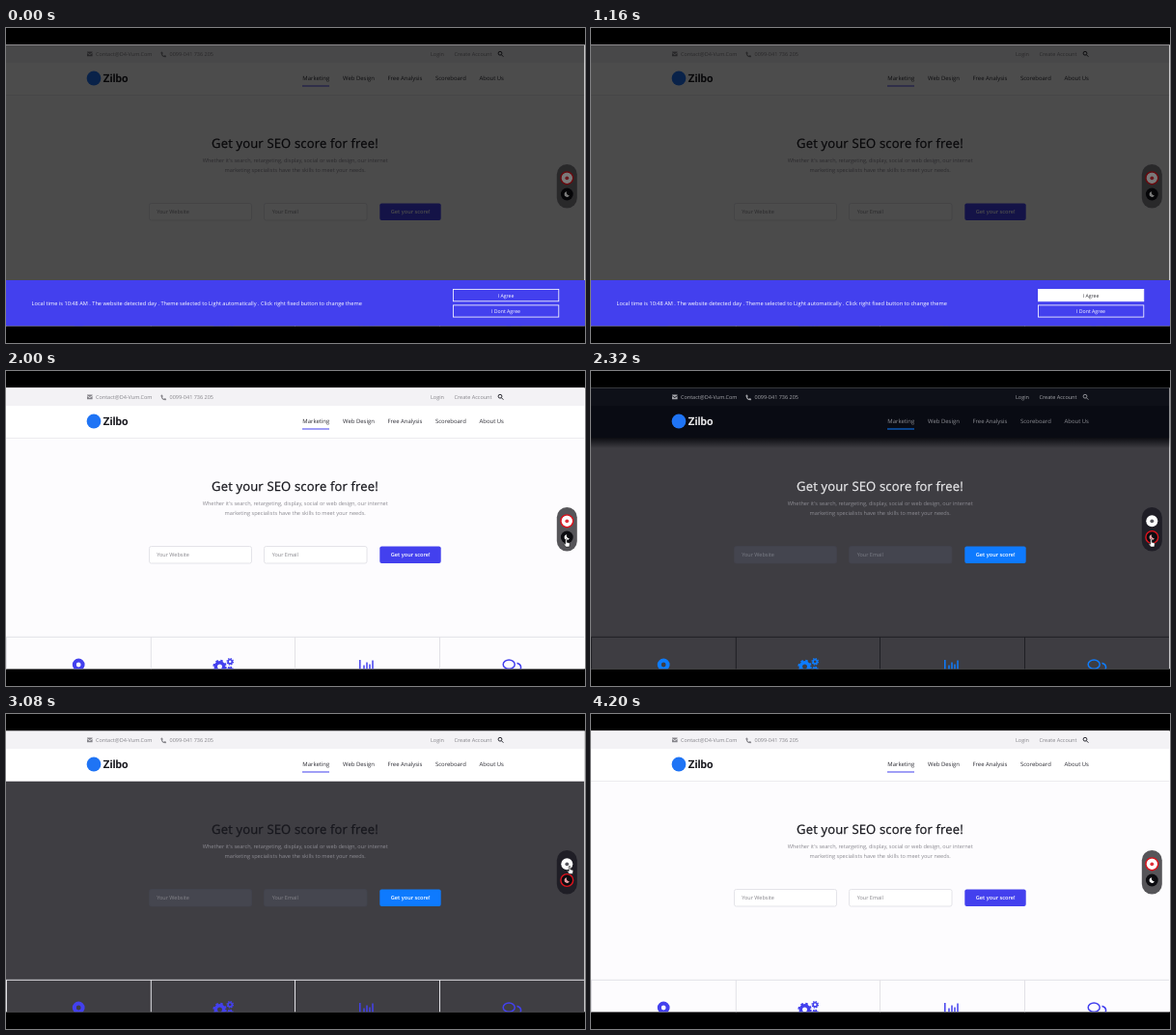
Write an HTML page that moves like this. It is 600 by 326 pixels and loops after 4280 ms.

```html
<!DOCTYPE html>
<html lang="en">
<head>
<meta charset="utf-8">
<title>SEO score page with theme switch</title>
<style>
html, body { margin: 0; width: 100%; height: 100%; overflow: hidden; background: #000; }
svg {
  display: block; width: 600px; height: 326px;
  font: 5.6px "Open Sans", "Noto Sans", sans-serif; text-rendering: geometricPrecision;
  --bar: #f3f2f5; --head: #fff; --top: #85848a; --nav: #2b2b33; --ink: #17171d;
  --sub: #8c8b92; --line: #e2e1e6; --accent: #4340ee; --hint: #85848a;
}
svg.dark {
  --bar: #0e1018; --head: #090b13; --top: #a4a5aa; --nav: #8d8e94; --ink: #e8e8ea;
  --line: #1f1f24; --accent: #0d7cff; --hint: #7b7e87;
}
.top { fill: var(--top); font-size: 5.5px; }
.nav { fill: var(--nav); font-size: 5.95px; }
.brand { fill: var(--ink); font: 700 11.5px Roboto, sans-serif; }
.title { fill: var(--ink); stroke: var(--ink); stroke-width: .25; font-size: 13px; letter-spacing: .17px; }
.sub { fill: var(--sub); }
.mid { text-anchor: middle; }
.hint { fill: var(--hint); font-size: 5.5px; }
.field { fill: var(--field); stroke: var(--edge); stroke-width: .8; }
.outline { fill: none; stroke: var(--accent); stroke-width: 1.5; }
.cards { fill: none; stroke: var(--line); }
.choice { fill: none; stroke: #fff; stroke-width: .8; }
.notice { fill: #fff; font-size: 5.64px; }
.notice .mid { font-size: 5.2px; }
.hover #agree { fill: #fff; }
.hover #agreeText { fill: #33333a; }
.cursor { fill: #fff; stroke: #111; stroke-width: .6; }
</style>
</head>
<body>
<svg id="stage" viewBox="0 0 600 326">
  <defs>
    <clipPath id="screen"><rect y="17.5" width="600" height="290.7"/></clipPath>
    <linearGradient id="shade" x2="0" y2="1">
      <stop stop-color="#06070c" stop-opacity=".9"/>
      <stop offset="1" stop-color="#06070c" stop-opacity="0"/>
    </linearGradient>
  </defs>
  <g clip-path="url(#screen)">
    <rect y="17" width="600" height="292" fill="#fff"/>
    <rect y="17" width="599.3" height="292" fill="var(--bg)"/>

    <!-- header -->
    <rect y="17" width="599.3" height="19" fill="var(--bar)"/>
    <rect y="36" width="599.3" height="33" fill="var(--head)"/>
    <rect id="headLine" y="69" width="599.3" height=".8" fill="#e9e8ec"/>
    <rect id="headShade" y="69" width="599.3" height="11" fill="url(#shade)"/>
    <g class="top">
      <path d="M84 24.6h5.6v.7l-2.8 1.8-2.8-1.8zM84 26.1l2.8 1.8 2.8-1.8v3.1h-5.6z"/>
      <text x="93" y="29">Contact@D4-Vum.Com</text>
      <path d="M160.4 25l1.4-.6 1 1.8-.9.9q.6 1.3 1.8 1.8l.8-.9 1.7 1-.6 1.3q-4.8.2-5.2-5.3z"/>
      <text x="169.5" y="29">0099-041 736 205</text>
      <text x="440" y="29">Login</text>
      <text x="464.5" y="29">Create Account</text>
    </g>
    <g fill="none" stroke="var(--nav)" stroke-width="1"><circle cx="512" cy="26.2" r="1.9"/><path d="M513.4 27.7l2 2"/></g>
    <circle cx="91" cy="52" r="7.4" fill="#1f74f5"/>
    <text class="brand" x="100.5" y="56.2">Zilbo</text>
    <g class="nav">
      <text x="307.3" y="54.2">Marketing</text>
      <text x="349" y="54.2">Web Design</text>
      <text x="395.5" y="54.2">Free Analysis</text>
      <text x="445" y="54.2">Scoreboard</text>
      <text x="490.5" y="54.2">About Us</text>
    </g>
    <rect x="307" y="59.5" width="28" height="1" fill="var(--accent)"/>

    <!-- form -->
    <text class="title mid" x="299.5" y="124">Get your SEO score for free!</text>
    <g class="sub mid">
      <text x="299.7" y="139">Whether it's search, retargeting, display, social or web design, our internet</text>
      <text x="299.7" y="148.5">marketing specialists have the skills to meet your needs.</text>
    </g>
    <rect class="field" x="148.5" y="181.5" width="106" height="17.5" rx="2"/>
    <rect class="field" x="267.5" y="181.5" width="106.5" height="17.5" rx="2"/>
    <text class="hint" x="156.2" y="192.3">Your Website</text>
    <text class="hint" x="275.7" y="192.3">Your Email</text>
    <rect x="387.3" y="181.4" width="63.4" height="17.6" rx="2" fill="var(--btn)"/>
    <text class="mid" x="419.2" y="192.3" fill="#fff" font-weight="600">Get your score!</text>

    <!-- cards -->
    <path class="cards" d="M0 275.3h599M.5 275v34M150.3 275v34M299.5 275v34M449.5 275v34"/>
    <circle cx="75.2" cy="304" r="4.4" fill="none" stroke="var(--accent)" stroke-width="4"/>
    <g fill="none" stroke="var(--accent)">
      <circle cx="221.5" cy="306" r="4.2" stroke-width="3.4"/>
      <circle cx="221.5" cy="306" r="6.2" stroke-width="2" stroke-dasharray="2.5 2.37"/>
      <g id="smallGear">
        <circle cx="232.2" cy="300.8" r="2.1" stroke-width="1.6"/>
        <circle cx="232.2" cy="300.8" r="3.2" stroke-width="1.2" stroke-dasharray="1.4 1.11"/>
      </g>
      <use href="#smallGear" y="8.6"/>
    </g>
    <path class="outline" d="M366.8 299v10M371 304.5v5M374 301.5v8M377 303.5v6M380 299.5v10"/>
    <path class="outline" d="M529.5 302.3c5 1.2 5 6 2 7.7"/>
    <ellipse class="outline" cx="521.2" cy="303.7" rx="6" ry="4.6"/>

    <!-- consent notice -->
    <rect id="veil" y="17" width="599.3" height="292"/>
    <g id="notice" class="notice">
      <rect y="261" width="600" height="48" fill="#4340ee"/>
      <text x="26.6" y="287">Local time is 10:48 AM . The website detected day . Theme selected to Light automatically . Click right fixed button to change theme</text>
      <rect id="agree" class="choice" x="463.4" y="270.4" width="109.4" height="12.4"/>
      <rect class="choice" x="463.4" y="286.9" width="109.4" height="12.2"/>
      <text id="agreeText" class="mid" x="518" y="278.7">I Agree</text>
      <text class="mid" x="518" y="295">I Dont Agree</text>
    </g>

    <!-- theme switch -->
    <rect x="570.8" y="141" width="21" height="45.5" rx="10.5" fill="var(--pill)"/>
    <circle cx="581.3" cy="155.3" r="6" fill="#fff"/>
    <circle id="sun" cx="581.3" cy="155.3" r="1.9"/>
    <circle cx="581.3" cy="172" r="6.4" fill="#0c0c10"/>
    <path id="moon" d="M581.2 169.3a2.8 2.8 0 1 0 2.7 3.9a2.6 2.6 0 0 1-2.7-3.9z"/>
    <circle id="ring" cx="581.3" r="6.4" fill="none" stroke="#e0121c" stroke-width="1.4"/>
    <rect id="pillShade" x="570.8" y="141" width="21" height="45.5" rx="10.5"/>

    <g id="cursor" class="cursor">
      <path id="arrow" d="M0 0v6.4l1.5-1.3 1 2.2 1-.5-1-2.1h2z"/>
      <path id="hand" d="M-.8 1.3q.8-1 1.6 0v3l2.5.6q.6.3.5 1l-.5 3.2h-3.7l-2.2-3.1q.3-1 1.8.2z"/>
    </g>
  </g>
</svg>
<script>
const LOOP = 4280, TO_DARK = 2060, TO_LIGHT = 3040, FADE = 300;
const $ = id => document.getElementById(id);
const stage = $('stage');

const smooth = x => (x = Math.min(1, Math.max(0, x)), x * x * (3 - 2 * x));
const ramp = (t, start, length) => smooth((t - start) / length);
const mix = (a, b, k) => `rgb(${a.map((v, i) => Math.round(v + (b[i] - v) * k))})`;

// light and dark ends of the colours that fade
const fades = {
  bg: [[253, 252, 254], [53, 52, 57]],
  field: [[255, 255, 255], [59, 60, 70]],
  edge: [[222, 221, 228], [59, 60, 70]],
  btn: [[67, 64, 238], [11, 125, 255]],
  pill: [[86, 85, 89], [28, 27, 35]],
};

// time, x, y
const path = [
  [1200, 535, 272], [1400, 559, 227], [1660, 580.5, 173], [2750, 580.5, 173],
  [2960, 584, 156.5], [3480, 584, 156.5], [3880, 574, 312],
];

function cursorAt(t) {
  const i = path.findIndex(p => p[0] > t);
  if (i < 1) return null;
  const [t0, x0, y0] = path[i - 1], [t1, x1, y1] = path[i];
  const raw = (t - t0) / (t1 - t0), k = i < 3 ? raw : smooth(raw);
  return [x0 + (x1 - x0) * k, y0 + (y1 - y0) * k];
}

const show = (id, on) => $(id).style.display = on ? '' : 'none';

function draw(t) {
  const dark = t >= TO_DARK && t < TO_LIGHT;
  const night = ramp(t, TO_DARK, FADE) - ramp(t, TO_LIGHT, FADE);
  stage.classList.toggle('dark', dark);
  for (const name in fades) stage.style.setProperty('--' + name, mix(...fades[name], night));
  show('headLine', !dark);
  show('headShade', dark);

  const notice = 1 - ramp(t, 1170, 330);
  $('notice').style.opacity = notice;
  $('veil').style.opacity = .7 * notice;
  $('pillShade').style.opacity = .52 * notice;
  $('notice').classList.toggle('hover', t >= 900);

  const moonOn = night > .4;
  $('ring').setAttribute('cy', moonOn ? 172 : 155.3);
  $('sun').style.fill = moonOn ? '#55555c' : '#e0303a';
  $('moon').style.fill = moonOn ? '#e8a0a4' : '#fff';

  const at = cursorAt(t);
  show('cursor', at);
  if (at) {
    const overSwitch = at[0] > 571 && at[1] > 141 && at[1] < 186;
    show('hand', overSwitch);
    show('arrow', !overSwitch);
    $('cursor').setAttribute('transform', `translate(${at})`);
  }
}

const start = performance.now();
(function tick() {
  draw((performance.now() - start) % LOOP);
  requestAnimationFrame(tick);
})();
</script>
</body>
</html>
```
